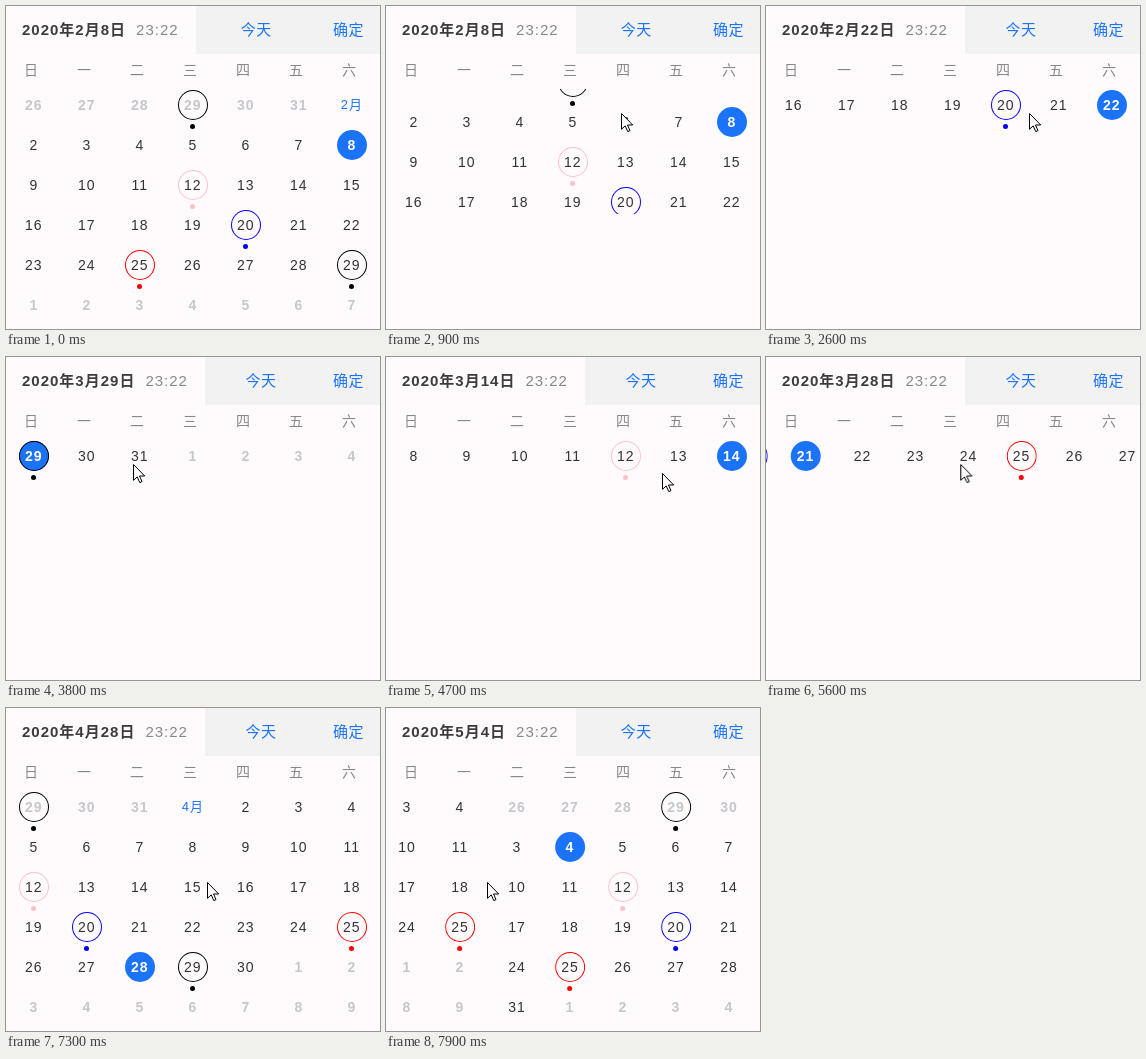
An HTML page that plays this animation: 374 by 323 pixels, repeating every 8000 ms.

```html
<!DOCTYPE html>
<html lang="zh">
<head>
<meta charset="utf-8">
<title>Calendar</title>
<style>
@property --fold { syntax: "<number>"; inherits: true; initial-value: 0; }
html, body { margin: 0; width: 100%; height: 100%; overflow: hidden; background: #fffbfc; }
#stage {
  position: relative; width: 374px; height: 323px; overflow: hidden; background: #fffbfc;
  font-family: "Liberation Sans", "Noto Sans CJK SC", "Noto Sans CJK", sans-serif;
  white-space: nowrap;
}
#head { position: absolute; width: 374px; height: 48px; overflow: hidden; }
.bar { display: flex; height: 48px; line-height: 48px; font-size: 15px; letter-spacing: 1px; color: #888; }
.bar b { margin: 0 10px 0 16px; color: #3c3c3c; }
.actions { flex: 1; display: flex; margin-left: 17px; background: #f2f2f2; color: #1b73fa; letter-spacing: .5px; }
.actions span:first-child { flex: 1; text-align: center; }
.actions span:last-child { padding: 0 16px; }
.weekday {
  position: absolute; top: 54px; width: 20px; line-height: 20px;
  text-align: center; font-size: 14px; color: #888;
}
#grid { position: absolute; top: 83px; width: 374px; height: calc(240px - 200px * var(--fold)); overflow: hidden; }
.page { position: absolute; transform: translateY(calc(-40px * var(--row) * var(--fold))); }
.day {
  position: absolute; width: 30px; height: 30px; border-radius: 50%;
  line-height: 30px; text-align: center; font-size: 14px; letter-spacing: 1px; color: #333;
}
.day span { position: absolute; inset: 0 .4px 0 0; }
.first { color: #1b73fa; font-size: 13px; }
.other { color: #c4c7cb; font-weight: bold; }
.picked { color: #fff; font-weight: bold; background: #1b73fa; }
.ring { box-shadow: inset 0 0 0 1px var(--mark); }
.ring::after {
  content: ""; position: absolute; left: 12px; top: 34px;
  width: 5px; height: 5px; border-radius: 50%; background: var(--mark);
}
#cursor { position: absolute; left: 0; top: 0; }
</style>
</head>
<body>
<div id="stage">
  <div id="head"><div id="bars"></div></div>
  <div id="grid"><div id="track"></div></div>
  <svg id="cursor" width="13" height="20">
    <path d="M.5 .5V16.3L4.2 12.9 6.8 18.6 9 17.6 6.5 12H11.7Z" fill="#fff" stroke="#000"/>
  </svg>
</div>
<script>
const LOOP = 8000, TICK = 100, PAGE = 375, COL = 53, ROW = 40;
const DRAG = 110, SETTLE = 160, TRAVEL = 100;
const $ = id => document.getElementById(id);
const marks = { 12: 'pink', 20: 'blue', 25: 'red', 29: 'black' };
const leadDays = month => new Date(2020, month - 1, 1).getDay();

// Each swipe steps a week; past the month's end it keeps the day and the row.
const views = [];
function addWeeks(month, firstDay) {
  for (let day = firstDay; day <= 29; day += 7)
    views.push({ month, day, row: Math.floor((leadDays(month) + day - 1) / 7) });
}
function flipMonth() {
  const last = views[views.length - 1];
  views.push({ ...last, month: last.month + 1 });
}
addWeeks(2, 8);
flipMonth();
addWeeks(3, 7);
flipMonth();
views.push({ month: 5, day: 4, row: 1 });

// Week swipes come at an even pace; the last one turns the open month.
const swipes = views.slice(1).map((_, n) => ({ release: 1840 + 520 * n, x: 265, y: 107 }));
swipes[swipes.length - 1] = { release: 7800, x: 201, y: 174 };

function dayCell({ month, day: picked }, i) {
  const date = new Date(2020, month - 1, 1 - leadDays(month) + i);
  const day = date.getDate(), own = date.getMonth() === month - 1;
  const names = ['day'];
  if (!own) names.push('other');
  else if (day === picked) names.push('picked');
  else if (day === 1) names.push('first');
  if (marks[day]) names.push('ring');
  const left = 13 + i % 7 * COL, top = 1 + Math.floor(i / 7) * ROW;
  const label = own && day === 1 ? month + '月' : day;
  return `<div class="${names.join(' ')}" style="left:${left}px;top:${top}px;--mark:${marks[day]}"><span>${label}</span></div>`;
}

$('track').innerHTML = views.map((view, n) =>
  `<div class="page" style="left:${n * PAGE}px;--row:${view.row}">` +
  Array.from({ length: 42 }, (_, i) => dayCell(view, i)).join('') + '</div>').join('');

$('bars').innerHTML = views.map(({ month, day }) =>
  `<div class="bar"><b>2020年${month}月${day}日</b>23:22` +
  '<div class="actions"><span>今天</span><span>确定</span></div></div>').join('');

[...'日一二三四五六'].forEach((name, i) => $('head').insertAdjacentHTML('afterend',
  `<div class="weekday" style="left:${15 + i * COL}px">${name}</div>`));

const animations = [];
function play(el, keys) {
  const first = keys[0], last = keys[keys.length - 1];
  const frames = [[0, first[1]], ...keys, [LOOP, last[1]]]
    .map(([time, props]) => ({ offset: time / LOOP, ...props }));
  const animation = el.animate(frames, { duration: LOOP, iterations: Infinity });
  animation.pause();
  animations.push(animation);
}
const move = (x, y, easing = 'linear') => ({ transform: `translate(${x}px, ${y}px)`, easing });

play($('track'), swipes.flatMap(({ release }, n) => [
  [release - DRAG, move(-n * PAGE, 0)],
  [release, move(-n * PAGE - TRAVEL, 0)],
  [release + SETTLE, move(-(n + 1) * PAGE, 0)]
]));

play($('bars'), [[0, move(0, 0, 'step-end')], ...swipes.map(({ release }, n) =>
  [release, move(0, -48 * (n + 1), 'step-end')])]);

play($('grid'), [[550, 0], [1159, 1], [6850, 1], [7300, 0]]
  .map(([time, fold]) => [time, { '--fold': fold }]));

// Pointer: the swipes plus a few resting points (time, x, y).
const rests = [
  [100, 225, 285], [550, 236, 240], [900, 235, 107], [2600, 263, 107], [3800, 127, 107],
  [4700, 276, 116], [6500, 179, 102], [6600, 241, 101], [6850, 243, 102], [7150, 201, 174]
];
const drags = swipes.flatMap(({ release, x, y }) =>
  [[release - DRAG, x, y], [release, x - TRAVEL, y]]);
play($('cursor'), [...rests, ...drags].sort((a, b) => a[0] - b[0])
  .map(([time, x, y]) => [time, move(x, y)]));
play($('cursor'), [[0, { opacity: 0, easing: 'step-end' }], [100, { opacity: 1 }]]);

// The picture advances ten times a second.
let origin;
function tick(now) {
  origin ??= now;
  const time = Math.floor((now - origin) % LOOP / TICK) * TICK;
  for (const animation of animations) animation.currentTime = time;
  requestAnimationFrame(tick);
}
requestAnimationFrame(tick);
</script>
</body>
</html>
```
